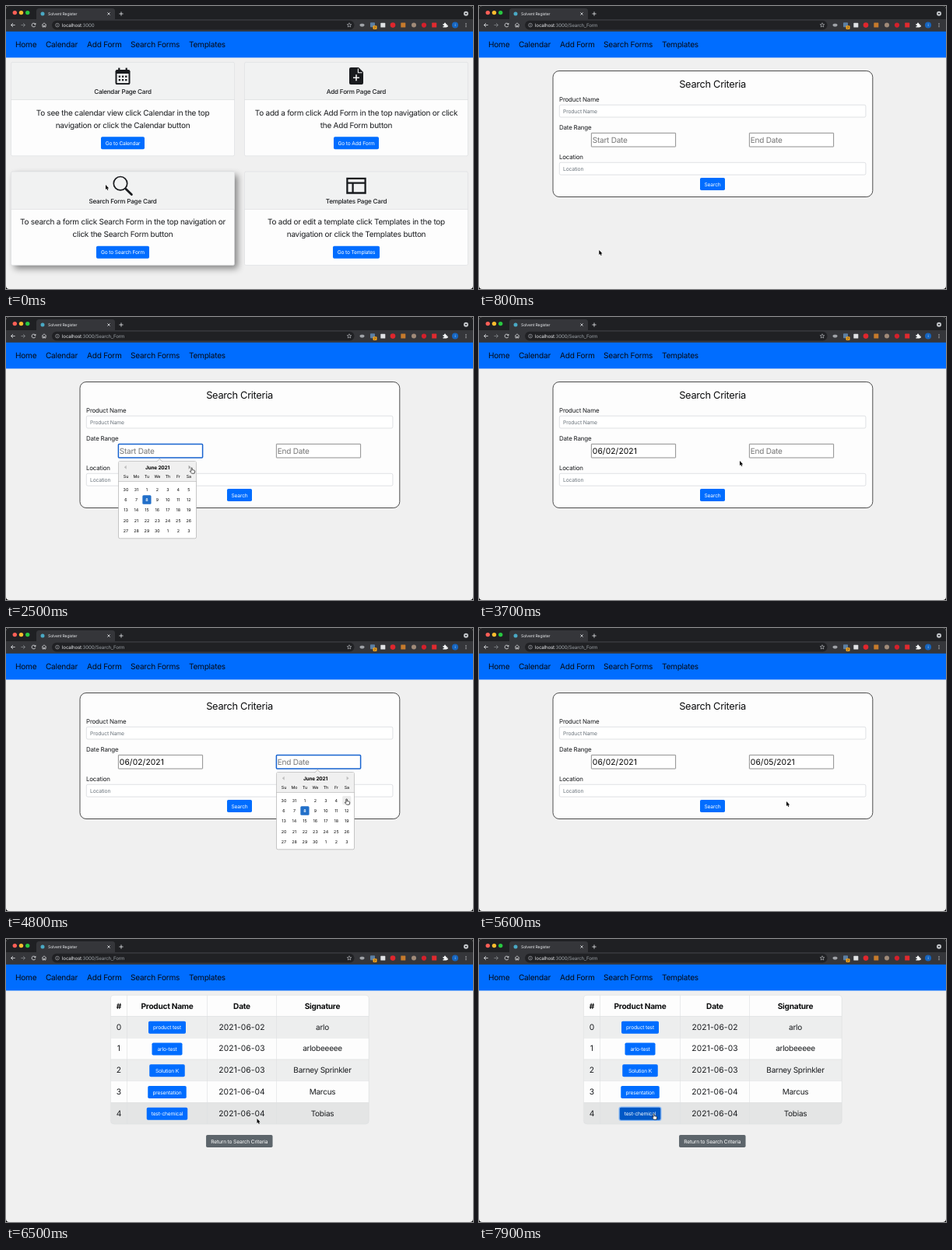
An HTML page with a canvas for the animation above (8 s loop, 600 px wide and 364 px high).

```html
<!DOCTYPE html>
<html lang="en">
<head>
<meta charset="utf-8">
<title>Search form demo</title>
<style>
  html, body { margin: 0; width: 100%; height: 100%; overflow: hidden; background: #000; }
  canvas { display: block; width: 100vw; height: 100vh; }
</style>
</head>
<body>
<canvas id="stage"></canvas>
<script>
const W = 600, H = 364, LOOP = 8000, STEP = 100;
const BLUE = '#006dff', BLUE_HOVER = '#005fdc', BLUE_DOWN = '#0058c6';
const INK = '#191b1e', PANEL = '#fdfdfd', LINE = '#d9dbdd', LIGHT = '#e8eaed';

const canvas = document.getElementById('stage');
const ctx = canvas.getContext('2d');
const ratio = Math.max(1, window.devicePixelRatio || 1);
canvas.width = W * ratio;
canvas.height = H * ratio;

// Moments of the clicks, in ms
const AT = { form: 700, openStart: 1700, pickStart: 3300, openEnd: 4200, pickEnd: 5100, table: 6200, press: 7500 };

// Pointer stops: time, x, y
const PATH = [
  [0, 128, 230], [200, 130, 240], [500, 153, 314], [1000, 155, 314], [1600, 196, 174],
  [2000, 196, 174], [2400, 238, 194], [2800, 238, 194], [3100, 195, 220], [3300, 195, 220],
  [3700, 335, 185], [3900, 335, 185], [4100, 388, 173], [4400, 388, 173], [4800, 437, 220],
  [5100, 437, 220], [5600, 395, 223], [5900, 303, 229], [6200, 303, 229], [6500, 322.5, 231],
  [6700, 230, 222], [7000, 230, 222], [7300, 224, 225], [8000, 224, 225]
];

const pointer = { x: 0, y: 0, shape: 'arrow' };

function movePointer(t) {
  const i = Math.max(1, PATH.findIndex(p => p[0] > t));
  const [t0, x0, y0] = PATH[i - 1], [t1, x1, y1] = PATH[i];
  const u = (t - t0) / (t1 - t0), k = u * u * (3 - 2 * u);
  pointer.x = x0 + (x1 - x0) * k;
  pointer.y = y0 + (y1 - y0) * k;
  pointer.shape = 'arrow';
}

function over(x, y, w, h, shape) {
  const hit = pointer.x >= x && pointer.x <= x + w && pointer.y >= y && pointer.y <= y + h;
  if (hit && shape) pointer.shape = shape;
  return hit;
}

// Drawing helpers
function text(s, x, y, size, color = INK, align = 'left', weight = 400) {
  const px = size * 0.97;
  const tracking = /^[\d/-]+$/.test(s) ? 0.01 : -0.024;
  ctx.font = `${weight} ${px}px Inter, "Open Sans", sans-serif`;
  ctx.textRendering = 'geometricPrecision';
  ctx.letterSpacing = `${tracking * px}px`;
  ctx.textAlign = align;
  ctx.fillStyle = color;
  ctx.fillText(s, x, y);
  return ctx.measureText(s).width;
}

function rect(x, y, w, h, color) {
  ctx.fillStyle = color;
  ctx.fillRect(x, y, w, h);
}

function round(x, y, w, h, r, fill, stroke, line = 0.6) {
  ctx.beginPath();
  ctx.roundRect(x, y, w, h, r);
  paint(fill, stroke, line);
}

function dot(x, y, r, fill, stroke, line) {
  ctx.beginPath();
  ctx.arc(x, y, r, 0, Math.PI * 2);
  paint(fill, stroke, line);
}

function shape(d, x, y, fill, stroke, line) {
  ctx.save();
  ctx.translate(x, y);
  const p = new Path2D(d);
  if (fill) { ctx.fillStyle = fill; ctx.fill(p); }
  if (stroke) { ctx.strokeStyle = stroke; ctx.lineWidth = line; ctx.stroke(p); }
  ctx.restore();
}

function paint(fill, stroke, line) {
  if (fill) { ctx.fillStyle = fill; ctx.fill(); }
  if (stroke) { ctx.strokeStyle = stroke; ctx.lineWidth = line; ctx.stroke(); }
}

function button(label, cx, cy, w, color = BLUE, pressed = false) {
  const x = cx - w / 2, y = cy - 8;
  const hover = over(x, y, w, 16, 'hand');
  if (pressed) round(x - 1.3, y - 1.3, w + 2.6, 18.6, 3, '#8fbcf5');
  const fill = pressed ? BLUE_DOWN : hover && color === BLUE ? BLUE_HOVER : color;
  round(x, y, w, 16, 1.8, fill);
  text(label, cx, cy + 2.5, 6.85, '#fff', 'center');
}

// Browser frame
function chrome(path) {
  rect(0, 0, W, 18, '#1f2023');
  ctx.beginPath();
  ctx.roundRect(39, 3, 101, 16, [3.5, 3.5, 0, 0]);
  paint('#35363a');
  rect(0, 17, W, 16, '#35363a');
  ['#ff5f57', '#febc2e', '#28c840'].forEach((c, i) => dot(11.3 + i * 8.2, 8.6, 2.7, c));
  dot(47, 10, 2.5, '#4aa9c4');
  text('Solvent Register', 54, 12, 5.28, LIGHT);
  shape('M-1.6-1.6L1.6 1.6M1.6-1.6L-1.6 1.6', 132, 10, null, LIGHT, 0.8);
  shape('M-2.6 0H2.6M0-2.6V2.6', 148, 10, null, LIGHT, 0.8);
  dot(591, 9.8, 3, '#c4c7cb');
  shape('M-1.5-.7H1.5L0 1.2Z', 591, 9.8, '#1f2023');

  shape('M2.6 0H-2.4M0-2.5L-2.5 0L0 2.5', 9, 24.5, null, LIGHT, 0.8);
  shape('M-2.6 0H2.4M0-2.5L2.5 0L0 2.5', 22, 24.5, null, '#85888c', 0.8);
  ctx.beginPath();
  ctx.arc(35.5, 24.5, 2.4, 0.3, 5.4);
  paint(null, LIGHT, 0.8);
  shape('M.4-.4H2.8V-2.8Z', 35.5, 24.5, LIGHT);
  shape('M-3 0L0-2.7L3 0M-2 -.5V2.5H-.6V.8H.6V2.5H2V-.5', 49, 24.5, null, LIGHT, 0.7);

  round(59, 18.8, 388.5, 11.6, 5.8, '#202124');
  dot(66, 24.6, 2.4, null, '#b5b8bc', 0.6);
  shape('M0-.3V1.4M0-1.4V-.8', 66, 24.6, null, '#b5b8bc', 0.6);
  let x = 72;
  x += text('localhost', x, 26.8, 6.36, LIGHT);
  text(':3000' + path, x, 26.8, 6.36, '#9aa0a6');
  shape('M0-2.8L.8-.9L2.8-.8L1.2.5L1.8 2.5L0 1.4L-1.8 2.5L-1.2.5L-2.8-.8L-.8-.9Z', 441, 24.5, null, '#c4c7cb', 0.6);

  round(454.5, 22.8, 6, 3.6, 1.8, '#a0a3a8');
  round(468, 21.2, 6, 6, 0.8, '#5c7fa3');
  round(471.5, 25.2, 5, 4.8, 1, '#f3a31c');
  text('2', 474, 29, 4, '#222', 'center');
  round(481.3, 21.8, 6, 5.8, 0.6, '#dfe1e4');
  dot(497, 24.6, 3.3, '#e0262d');
  round(507.3, 21.4, 6, 6.2, 0.6, '#c67a2c');
  dot(524, 24.6, 3, '#a08a78');
  dot(537, 24.6, 3.1, '#d3202b');
  round(547.2, 21.6, 6, 6, 0.6, '#e02a2f');
  shape('M-2.6-1.5H-1A1.1 1.1 0 1 1 1-1.5H2.3V.2A1.1 1.1 0 1 1 2.3 2.2V3H-2.6V1.5A.9.9 0 1 0-2.6 0Z', 564, 24.6, '#f1f3f4');
  dot(577, 24.6, 4, '#1565c0');
  text('i', 577, 26.4, 5, '#fff', 'center');
  [-2, 0, 2].forEach(d => dot(591, 24.6 + d, 0.6, LIGHT));
}

function navbar() {
  rect(0, 32.8, W, 33.6, BLUE);
  const items = [['Home', 12], ['Calendar', 51], ['Add Form', 104], ['Search Forms', 160], ['Templates', 235]];
  items.forEach(([s, x]) => text(s, x, 53.3, 10.4, '#050a14'));
}

// Home page
const ICONS = {
  calendar(x, y) {
    round(x - 9.5, y - 8.5, 19, 19, 2.2, INK);
    rect(x - 5.8, y - 11, 2.2, 4, INK);
    rect(x + 3.6, y - 11, 2.2, 4, INK);
    rect(x - 7.5, y - 3.6, 15, 12.1, '#f1f2f2');
    for (let i = 0; i < 6; i++) rect(x - 5.3 + (i % 3) * 4.2, y - 1 + Math.floor(i / 3) * 4.4, 2.3, 2.3, INK);
  },
  file(x, y) {
    shape('M-7-11H3L9-5V9Q9 11 7 11H-7Q-9 11-9 9V-9Q-9-11-7-11Z', x, y - 0.5, INK);
    shape('M2.4-9.6V-4.4H7.6', x, y - 0.5, null, '#f1f2f2', 1.1);
    shape('M-4 2.2H4M0-1.8V6.2', x, y - 0.5, null, '#f1f2f2', 1.6);
  },
  search(x, y) {
    dot(x - 3, y - 3, 8.7, null, INK, 1.7);
    ctx.lineCap = 'round';
    shape('M4.2 4.4L11.4 11.4', x, y, null, INK, 2.8);
    ctx.lineCap = 'butt';
  },
  layout(x, y) {
    shape('M-11.6-9.3H11.6V9.3H-11.6ZM-11.6-3.6H11.6M-4.4-3.6V9.3', x, y, null, INK, 2.3);
  }
};

const CARDS = [
  ['Calendar Page Card', 'calendar', 'To see the calendar view click Calendar in the top', 'navigation or click the Calendar button', 'Go to Calendar', 56],
  ['Add Form Page Card', 'file', 'To add a form click Add Form in the top navigation or click', 'the Add Form button', 'Go to Add Form', 58],
  ['Search Form Page Card', 'search', 'To search a form click Search Form in the top navigation or', 'click the Search Form button', 'Go to Search Form', 68],
  ['Templates Page Card', 'layout', 'To add or edit a template click Templates in the top', 'navigation or click the Templates button', 'Go to Templates', 60]
];

function home() {
  CARDS.forEach(([title, icon, line1, line2, label, w], i) => {
    const x = 6.5 + (i % 2) * 300, y = 72.4 + Math.floor(i / 2) * 140.6, cx = x + 143.5;
    ctx.save();
    if (over(x, y, 287, 120.4)) {
      ctx.shadowColor = 'rgba(0,0,0,.45)';
      ctx.shadowBlur = 8 * ratio;
      ctx.shadowOffsetX = ctx.shadowOffsetY = 4.3 * ratio;
    }
    round(x, y, 287, 120.4, 1.7, PANEL);
    ctx.restore();
    rect(x, y, 287, 48.4, '#f1f2f2');
    rect(x, y + 48, 287, 0.6, LINE);
    round(x, y, 287, 120.4, 1.7, null, LINE);
    ICONS[icon](cx, y + 18.2);
    text(title, cx, y + 40.7, 8.35, INK, 'center', 500);
    text(line1, cx, y + 68.3, 10.3, INK, 'center');
    text(line2, cx, y + 84.2, 10.3, INK, 'center');
    button(label, cx, y + 103.8, w);
  });
}

// Search page
function field(label, y) {
  text(label, 103, y - 4, 8.2);
  over(103, y, 394, 16, 'beam');
  round(103.3, y, 393.6, 15.8, 1.8, '#fff', '#c9cdd2');
  text(label, 108, y + 10.5, 7, '#6c757d');
}

function dateField(x, hint, value, focused) {
  over(x, 163, 108.6, 18, 'beam');
  round(x + 0.4, 163.4, 108.2, 17.6, focused ? 1 : 0.3, '#fff', focused ? '#1763cf' : '#858585', focused ? 1.5 : 0.9);
  text(value || hint, x + 1.8, 176.2, value ? 10.6 : 10.3, value ? '#000' : '#757575');
}

function picker(x) {
  round(x + 0.5, 185.6, 100, 99.2, 1.8, '#fff', '#aeaeae', 0.7);
  rect(x + 0.9, 186, 99.2, 25.2, '#f0f0f0');
  rect(x + 0.5, 211, 100, 0.6, '#aeaeae');
  shape('M-3.6 4L0 0L3.6 4', x + 53.3, 182.2, '#f0f0f0', '#aeaeae', 0.7);
  text('June 2021', x + 50.5, 196.2, 6.7, '#000', 'center', 700);
  shape('M1.4-2.5V2.5L-1.5 0Z', x + 9.3, 193.2, '#bdbdbd');
  const next = over(x + 87, 188, 11, 10, 'hand');
  shape('M-1.4-2.5V2.5L1.5 0Z', x + 92, 193.2, next ? '#a0a0a0' : '#bdbdbd');

  const col = i => x + 10 + (i % 7) * 13.47;
  ['Su', 'Mo', 'Tu', 'We', 'Th', 'Fr', 'Sa'].forEach((d, i) => text(d, col(i), 207, 5.5, '#000', 'center'));
  for (let i = 0; i < 35; i++) {
    const day = i < 2 ? 30 + i : i < 32 ? i - 1 : i - 31;
    const cx = col(i), cy = 221.6 + Math.floor(i / 7) * 13.4;
    const today = i === 9, hover = over(cx - 6, cy - 6, 12, 12, 'hand');
    if (today || hover) round(cx - 5.6, cy - 5.7, 11.2, 11.4, 1.5, today ? '#216fc9' : '#ececec');
    text(day, cx, cy + 2, 5.5, today ? '#fff' : '#000', 'center', today ? 600 : 400);
  }
}

function form(t) {
  const startOpen = t >= AT.openStart && t < AT.pickStart;
  const endOpen = t >= AT.openEnd && t < AT.pickEnd;
  round(95, 83.5, 410.8, 162, 8, PANEL, '#222', 0.8);
  text('Search Criteria', 300, 105, 13.2, '#0c0d0e', 'center');
  field('Product Name', 127.2);
  text('Date Range', 103, 159, 8.2);
  dateField(144, 'Start Date', t >= AT.pickStart && '06/02/2021', startOpen);
  dateField(347, 'End Date', t >= AT.pickEnd && '06/05/2021', endOpen);
  field('Location', 201.3);
  button('Search', 300, 229, 32);
  if (startOpen) picker(144);
  if (endOpen) picker(347);
}

// Results page
const ROWS = [
  ['product test', 48, '02', 'arlo'],
  ['arlo-test', 39, '03', 'arlobeeeee'],
  ['Solution K', 45.5, '03', 'Barney Sprinkler'],
  ['presentation', 49.5, '04', 'Marcus'],
  ['test-chemical', 52.5, '04', 'Tobias']
];

function table(t) {
  const x = 134.4, y = 72.2, w = 331.8, head = 27, rowH = 27.75, h = head + 5 * rowH;
  const cols = [145, 207, 303, 406.5];
  ctx.save();
  ctx.beginPath();
  ctx.roundRect(x, y, w, h, 4);
  ctx.clip();
  rect(x, y, w, h, PANEL);
  ROWS.forEach((_, i) => {
    const top = y + head + i * rowH, hover = over(x, top, w, rowH);
    rect(x, top, w, rowH, hover ? '#e4e5e5' : i % 2 ? PANEL : '#edeeee');
    rect(x, top, w, 0.6, '#dee0e2');
  });
  [155.4, 258.2, 347.2].forEach(cx => rect(cx, y, 0.6, h, '#dee0e2'));
  ctx.restore();
  round(x, y, w, h, 4, null, '#dcdee0');

  ['#', 'Product Name', 'Date', 'Signature'].forEach((s, i) => text(s, cols[i], 90, 10.4, '#0c0d0e', 'center', 700));
  ROWS.forEach(([name, bw, day, who], i) => {
    const cy = y + head + (i + 0.5) * rowH;
    text(i, cols[0], cy + 3.6, 10.6, INK, 'center');
    text('2021-06-' + day, cols[2], cy + 3.6, 10.6, INK, 'center');
    text(who, cols[3], cy + 3.6, 10.3, INK, 'center');
    button(name, cols[1], cy + 0.7, bw, BLUE, i === 4 && t >= AT.press);
  });
  button('Return to Search Criteria', 299.8, 260, 85.5, '#5d656b');
}

function drawPointer() {
  const { x, y, shape: kind } = pointer;
  ctx.lineJoin = 'round';
  if (kind === 'hand') {
    shape('M0 .2Q.8-.6 1.2.4V2.6L4 3.2Q5 3.6 4.7 5L4.1 7.2H.6L-1.6 4.6Q-1.6 3.6-.4 4.2L0 4.5Z', x, y, '#fff', '#111', 0.7);
  } else if (kind === 'beam') {
    shape('M-1.3-3.6Q0-3.6 0-2.8Q0-3.6 1.3-3.6M0-2.8V2.8M-1.3 3.6Q0 3.6 0 2.8Q0 3.6 1.3 3.6', x, y, null, '#222', 0.7);
  } else {
    const d = 'M0 0V6L1.4 4.8L2.3 7L3.3 6.6L2.4 4.4H4.2Z';
    shape(d, x, y, null, '#fff', 1);
    shape(d, x, y, '#000');
  }
  ctx.lineJoin = 'miter';
}

function draw(now) {
  const t = Math.floor((now % LOOP) / STEP) * STEP;
  ctx.setTransform(ratio, 0, 0, ratio, 0, 0);
  movePointer(t);
  rect(0, 0, W, H, '#000');
  ctx.save();
  ctx.beginPath();
  ctx.roundRect(0, 0, W, H, 4);
  ctx.clip();
  rect(0, 0, W, H, '#f0f0f0');
  chrome(t < AT.form ? '' : '/Search_Form');
  navbar();
  if (t < AT.form) home();
  else if (t < AT.table) form(t);
  else table(t);
  drawPointer();
  ctx.restore();
}

const begin = performance.now();
function tick() {
  draw(performance.now() - begin);
  requestAnimationFrame(tick);
}
tick();
</script>
</body>
</html>
```
